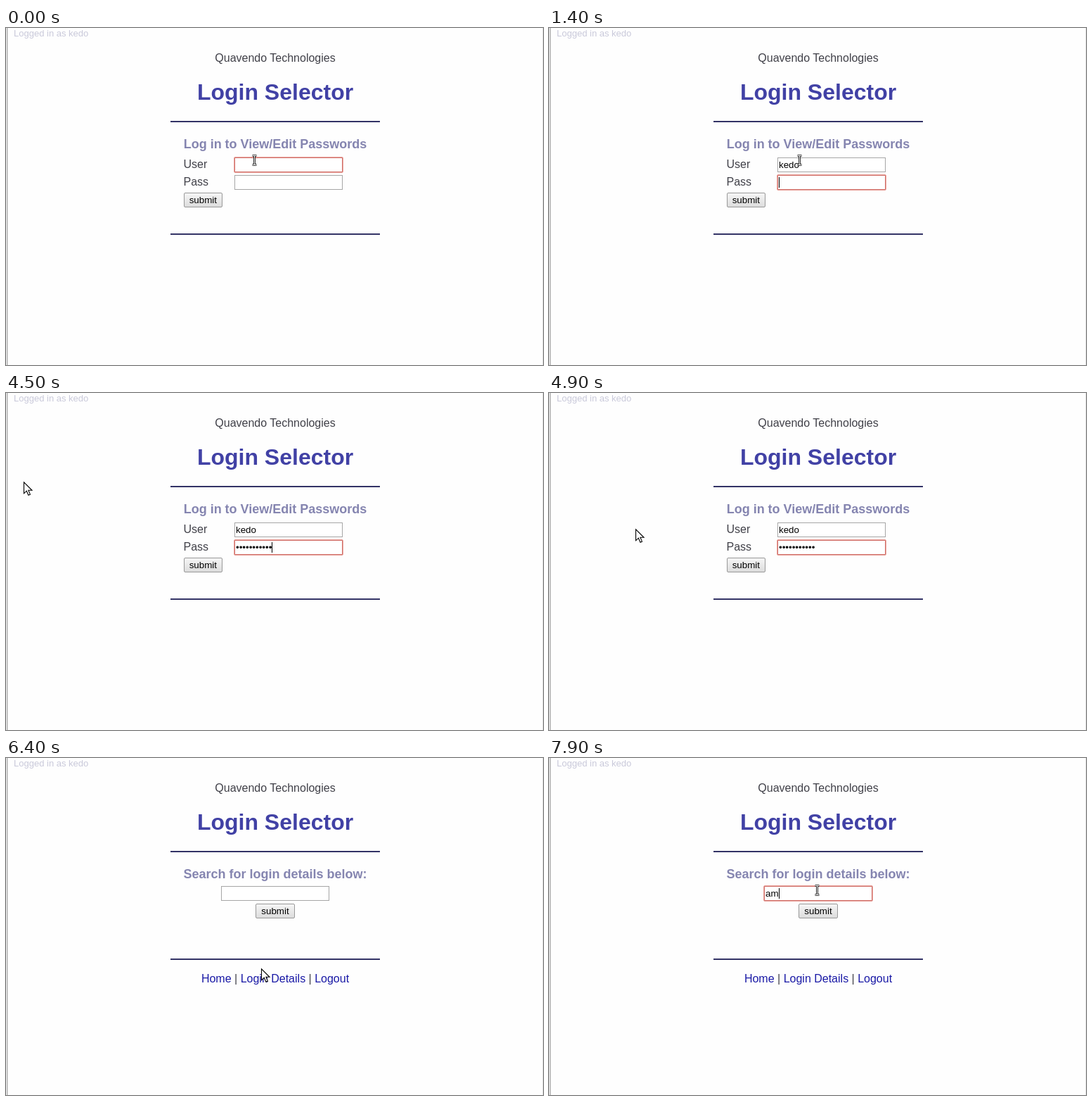
These frames come from a looping animation (764x479 px, 8 s). An HTML page:

```html
<!DOCTYPE html>
<html lang="en">
<head>
<meta charset="utf-8">
<title>Login Selector</title>
<style>
html, body { margin: 0; width: 100%; height: 100%; overflow: hidden; background: #fefefe; }
svg { display: block; }
text { font: 16px "Liberation Sans", Arial, sans-serif; fill: #404048; white-space: pre; }
.mid { text-anchor: middle; }
.title { font-size: 32px; font-weight: bold; fill: #4141a5; }
.heading { font-size: 18px; font-weight: bold; fill: #8585b0; }
.status { font-size: 13px; fill: #c9c9da; }
.control { font-size: 13.333px; fill: #000; }
.link { fill: #1a1aa6; }
.rule { fill: #333366; }
.button { fill: url(#face); stroke: #999; }
.field .box { fill: #fff; stroke: #a6a6a6; }
.field .ring { fill: none; stroke: #e9a39c; visibility: hidden; }
.focused .box { stroke: #d0706a; }
.focused .ring { visibility: visible; }
.beam { fill: none; stroke: #000; stroke-width: 2.7; }
.beam.core { stroke: #fff; stroke-width: 1; }
</style>
</head>
<body>
<svg width="764" height="479">
  <defs>
    <linearGradient id="face" x2="0" y2="1">
      <stop stop-color="#f6f6f6"/><stop offset="1" stop-color="#dcdcdc"/>
    </linearGradient>
  </defs>
  <rect x="1" width="1" height="479" fill="#a4a4a4"/>
  <rect x="2" width="1" height="479" fill="#e2e2e2"/>
  <rect x="763" width="1" height="479" fill="#ececec"/>
  <text class="status" x="11" y="12">Logged in as kedo</text>
  <text class="mid" x="383" y="48">Quavendo Technologies</text>
  <text class="mid title" x="383" y="102">Login Selector</text>
  <rect class="rule" x="234" y="132" width="298" height="2"/>

  <g id="login">
    <text class="mid heading" x="383" y="171">Log in to View/Edit Passwords</text>
    <text x="252.5" y="199">User</text>
    <text x="252.5" y="224">Pass</text>
    <rect class="button" x="253.5" y="234.5" width="54" height="20" rx="1.5"/>
    <text class="mid control" x="280.3" y="249">submit</text>
    <rect class="rule" x="234" y="292" width="298" height="2"/>
  </g>

  <g id="search">
    <text class="mid heading" x="383" y="171">Search for login details below:</text>
    <rect class="button" x="355.5" y="207.5" width="55" height="20" rx="1.5"/>
    <text class="mid control" x="383" y="222">submit</text>
    <rect class="rule" x="234" y="285" width="298" height="2"/>
    <text class="mid" x="383" y="319"><tspan class="link">Home</tspan> | <tspan class="link">Login Details</tspan> | <tspan class="link">Logout</tspan></text>
  </g>

  <path id="arrow" d="M.5 .8V16.8L4.3 13.2L6.9 19.2L9.4 18.1L6.9 12.3H12Z" fill="#fff" stroke="#000" stroke-width="1.1"/>
  <g id="beam">
    <path class="beam" d="M-2.5 -6.5H3.5M-2.5 6.5H3.5M.5 -6.5V6.5"/>
    <path class="beam core" d="M-2.5 -6.5H3.5M-2.5 6.5H3.5M.5 -6.5V6.5"/>
  </g>
</svg>
<script>
const LOOP = 8000, PAGE_CHANGE = 6400, BLINK = 600;
const $ = id => document.getElementById(id);
const show = (el, on) => el.setAttribute('visibility', on ? 'visible' : 'hidden');

// widths: advance of each character in px; keys: time of each keystroke
const em = 13.333;
const fields = [
  { page: 'login', x: 325, y: 184, from: 0, caretFrom: 200, to: 1400,
    value: 'kedo', widths: [.5, .556, .556, .556], keys: [800, 900, 1000, 1100] },
  { page: 'login', x: 325, y: 209, from: 1400, caretFrom: 1400, to: PAGE_CHANGE,
    value: '•'.repeat(11), widths: Array(11).fill(.35),
    keys: [1900, 2100, 2200, 2300, 2400, 2500, 2700, 2700, 2700, 2900, 3100] },
  { page: 'search', x: 306, y: 182, from: 7100, caretFrom: 7100, to: LOOP,
    value: 'am', widths: [.556, .833], keys: [7800, 7900] },
];

// time, x, y, pointer shape
const pointer = [
  [0, 353, 188, 'beam'], [200, 356, 188, 'beam'], [3200, 357, 189, 'beam'],
  [4300, 290, 176, 'arrow'], [4400, 100, 138, 'arrow'], [4500, 25, 126, 'arrow'],
  [4700, 40, 138, 'arrow'], [4800, 95, 174, 'arrow'], [4900, 123, 193, 'arrow'],
  [5400, 270, 258, 'arrow'], [5500, 363, 299, 'arrow'],
  [6700, 365, 285, 'arrow'], [6800, 372, 235, 'arrow'], [6900, 377, 200, 'beam'],
  [7000, 378, 193, 'beam'], [7100, 379, 190, 'beam'], [7200, 379, 189, 'beam'],
  [7300, 380, 188, 'beam'], [7700, 381, 188, 'beam'],
];

for (const f of fields) {
  const g = document.createElementNS('http://www.w3.org/2000/svg', 'g');
  g.setAttribute('class', 'field');
  g.innerHTML = `
    <rect class="box" x="${f.x + .5}" y="${f.y + .5}" width="153" height="20"/>
    <rect class="ring" x="${f.x - .5}" y="${f.y - .5}" width="155" height="22" rx="1.5"/>
    <text class="control" x="${f.x + 2}" y="${f.y + 15}"></text>
    <rect class="caret" y="${f.y + 3}" width="1" height="15"/>`;
  $(f.page).append(g);
  f.group = g;
  f.text = g.querySelector('text');
  f.caret = g.querySelector('.caret');
}

function drawField(f, t) {
  const focused = t >= f.from && t < f.to;
  const typed = f.keys.filter(k => k <= t).length;
  const lastInput = typed ? f.keys[typed - 1] : f.caretFrom;
  const width = f.widths.slice(0, typed).reduce((sum, w) => sum + w * em, 0);
  const lit = t >= lastInput && Math.floor((t - lastInput) / BLINK) % 2 === 0;
  f.group.classList.toggle('focused', focused);
  f.text.textContent = f.value.slice(0, typed);
  f.caret.setAttribute('x', Math.round(f.x + 2 + width));
  f.caret.style.display = focused && lit ? '' : 'none';
}

function draw(t) {
  const searching = t >= PAGE_CHANGE;
  $('login').style.display = searching ? 'none' : '';
  $('search').style.display = searching ? '' : 'none';
  fields.forEach(f => drawField(f, t));

  const [, x, y, shape] = pointer.filter(p => p[0] <= t).pop();
  for (const id of ['arrow', 'beam']) show($(id), id === shape);
  $(shape).setAttribute('transform', `translate(${x} ${y})`);
}

const start = performance.now();
function tick() {
  draw((performance.now() - start) % LOOP);
  requestAnimationFrame(tick);
}
tick();
</script>
</body>
</html>
```
